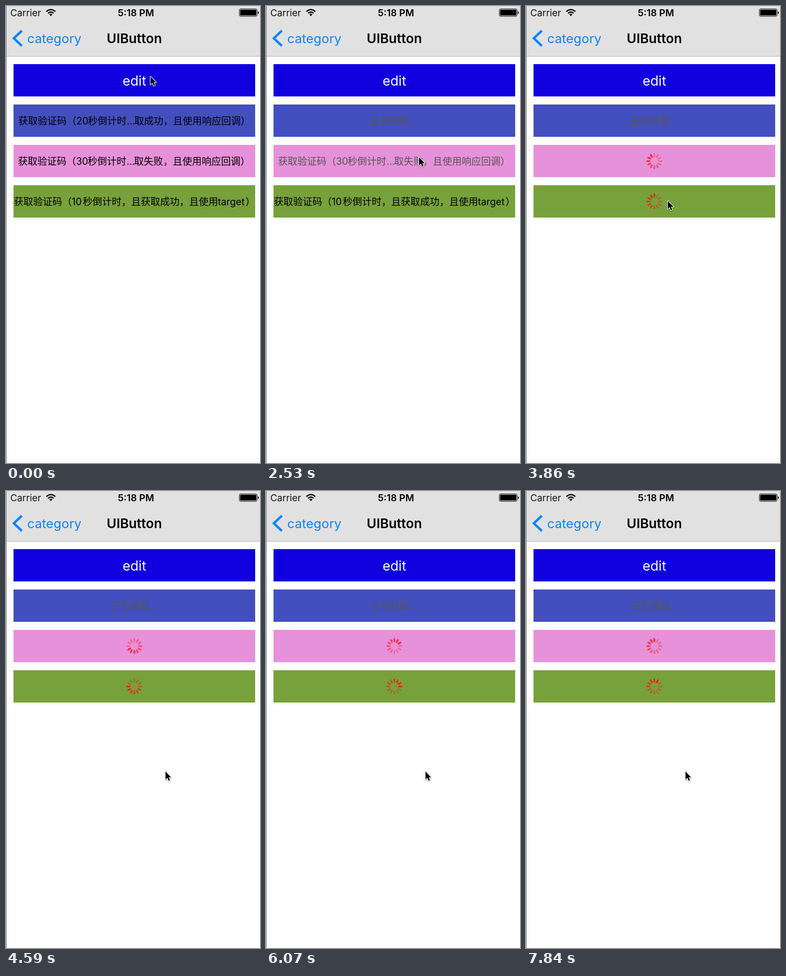
These frames come from a looping animation (473x849 px, 7990 ms). An HTML page:

```html
<!DOCTYPE html>
<html lang="zh-CN">
<head>
<meta charset="utf-8">
<title>Buttons</title>
<style>
  html, body { margin: 0; width: 100%; height: 100%; overflow: hidden; background: #fefefe; }
  svg { display: block; width: 473px; height: 849px; }
  text { font-family: Inter, "Noto Sans CJK SC", "Noto Sans CJK", sans-serif; }
  .label { font-size: 18px; text-spacing-trim: space-all; }
  .bold { font-weight: 600; }
  .mid { text-anchor: middle; }
  #cursor { filter: drop-shadow(0 1px 1px rgba(0, 0, 0, .4)); }
</style>
</head>
<body>
<svg viewBox="0 0 473 849">
  <rect width="473" height="849" fill="#fefefe"/>
  <rect width="473" height="93" fill="#e1e1e1"/>
  <rect y="93" width="473" height="1" fill="#b4b4b4"/>
  <rect width="1" height="849" fill="#777"/>

  <text x="8" y="18.7" font-size="17.5" fill="#111">Carrier</text>
  <g fill="none" stroke="#000" stroke-width="2.3">
    <path d="M75.2 10.3 Q83.5 2.9 91.8 10.3"/>
    <path d="M78.3 13.5 Q83.5 9 88.7 13.5"/>
  </g>
  <path d="M80.5 15.6 Q83.5 13.2 86.5 15.6 L83.5 18.8 Z"/>
  <text class="bold mid" x="242" y="18.7" font-size="17.7">5:18 PM</text>
  <rect x="434.5" y="5.5" width="33" height="13.6" rx="2.5" fill="none" stroke="#000"/>
  <rect x="436" y="7" width="30" height="10.6" rx="1.2"/>
  <path d="M469 10 Q471 10.2 471 12.3 T469 14.7 Z"/>

  <path d="M29.5 45.8 L14.6 60 L29.5 74.2" fill="none" stroke="#0b84ff" stroke-width="4.4"/>
  <text x="39.5" y="69" font-size="24" fill="#0b84ff">category</text>
  <text class="bold mid" x="239" y="69" font-size="24.5">UIButton</text>

  <rect x="14" y="108" width="450" height="60" fill="#1000e0"/>
  <text class="mid" x="239" y="147.5" font-size="25" fill="#fff">edit</text>

  <g id="buttons"></g>
  <path id="cursor" d="M0 0 V15 L3.5 11.8 L5.9 17.3 L8.3 16.2 L6 11 H10.5 Z"
        stroke="#fff" stroke-width="2" stroke-linejoin="round" paint-order="stroke"/>
</svg>
<script>
  const LOOP = 7990, SPOKES = 12;
  const DIM = '#555';
  const buttons = document.getElementById('buttons');
  const cursor = document.getElementById('cursor');

  // [step, x, y] of the pointer tip
  const path = [
    [0, 269, 131], [1, 274, 150], [2, 284, 185], [3, 291, 215], [4, 295, 225],
    [5, 295, 208], [7, 295, 208], [8, 290, 208], [13, 290, 208], [14, 289, 222],
    [16, 285, 281], [18, 285, 281], [19, 280, 318], [20, 268, 370], [21, 264, 380],
    [22, 264, 366], [23, 264, 362], [26, 264, 362], [27, 272, 400], [28, 290, 500],
    [29, 297, 538], [30, 297, 530], [31, 297, 521], [54, 297, 521]
  ];

  function add(parent, tag, attrs, text) {
    const el = document.createElementNS('http://www.w3.org/2000/svg', tag);
    for (const key in attrs) el.setAttribute(key, attrs[key]);
    if (text) el.textContent = text;
    parent.appendChild(el);
    return el;
  }

  // parts: pairs of start x and text
  function label(y, parts) {
    const el = add(buttons, 'text', { class: 'label', y: y + 37 });
    for (const [x, text] of parts) add(el, 'tspan', { x }, text);
    return el;
  }

  function spinner(y) {
    const el = add(buttons, 'g', {
      transform: `translate(239 ${y + 30.2})`,
      stroke: '#ff0a0a', 'stroke-width': 2.7, 'stroke-linecap': 'round'
    });
    for (let i = 0; i < SPOKES; i++) {
      add(el, 'path', { d: 'M0 -8.6 V-13.5', transform: `rotate(${i * 360 / SPOKES})` });
    }
    return el;
  }

  function button(y, fill, parts, press, busy) {
    add(buttons, 'rect', { x: 14, y, width: 450, height: 60, fill });
    return { title: label(y, parts), press, busy };
  }

  const longText = (x, secs, end) => [
    [x, '获取验证码（'], [x + 108, secs], [x + 129.5, '秒倒计时'], [x + 202, '...'], [x + 216, end]
  ];

  const blue = button(183, '#434fbe', longText(23, '20', '取成功，且使用响应回调）'), 10, 11);
  blue.wait = label(183, [[195, '正在获取'], [267, '...']]);
  blue.wait.setAttribute('fill', DIM);

  const pink = button(258, '#e791da', longText(22.5, '30', '取失败，且使用响应回调）'), 16, 18);
  pink.wait = spinner(258);

  const green = button(333, '#77a13a', [
    [14.5, '获取验证码（'], [122.5, '10'], [143, '秒倒计时，且获取成功，且使用'],
    [394.5, 'target'], [446, '）']
  ], 23, 25);
  green.wait = spinner(333);

  const show = (el, on) => el.setAttribute('visibility', on ? 'visible' : 'hidden');

  function spin(el, head) {
    [...el.children].forEach((spoke, i) => {
      const age = (head - i + SPOKES * 20) % SPOKES;
      spoke.setAttribute('opacity', Math.max(.33, .93 - age * .075));
    });
  }

  // The screen refreshes in steps of about 148 ms.
  function stepAt(t) {
    const step = t < 2100 ? t / 150 : 14 + (t - 2085) / 147;
    return Math.min(53, Math.floor(step));
  }

  function pointAt(step) {
    const i = path.findIndex(p => p[0] > step);
    const [s0, x0, y0] = path[i - 1], [s1, x1, y1] = path[i];
    const u = (step - s0) / (s1 - s0);
    return [x0 + (x1 - x0) * u, y0 + (y1 - y0) * u];
  }

  function draw(t) {
    const step = stepAt(t);
    for (const b of [blue, pink, green]) {
      show(b.title, step < b.busy);
      show(b.wait, step >= b.busy);
      b.title.setAttribute('fill', step >= b.press ? DIM : '#000');
    }
    const head = Math.floor(11.45 + 1.8 * (step - 26));
    spin(pink.wait, head);
    spin(green.wait, head + 1);
    cursor.setAttribute('transform', `translate(${pointAt(step)})`);
  }

  const start = performance.now();
  function tick() {
    draw((performance.now() - start) % LOOP);
    requestAnimationFrame(tick);
  }
  tick();
</script>
</body>
</html>
```
